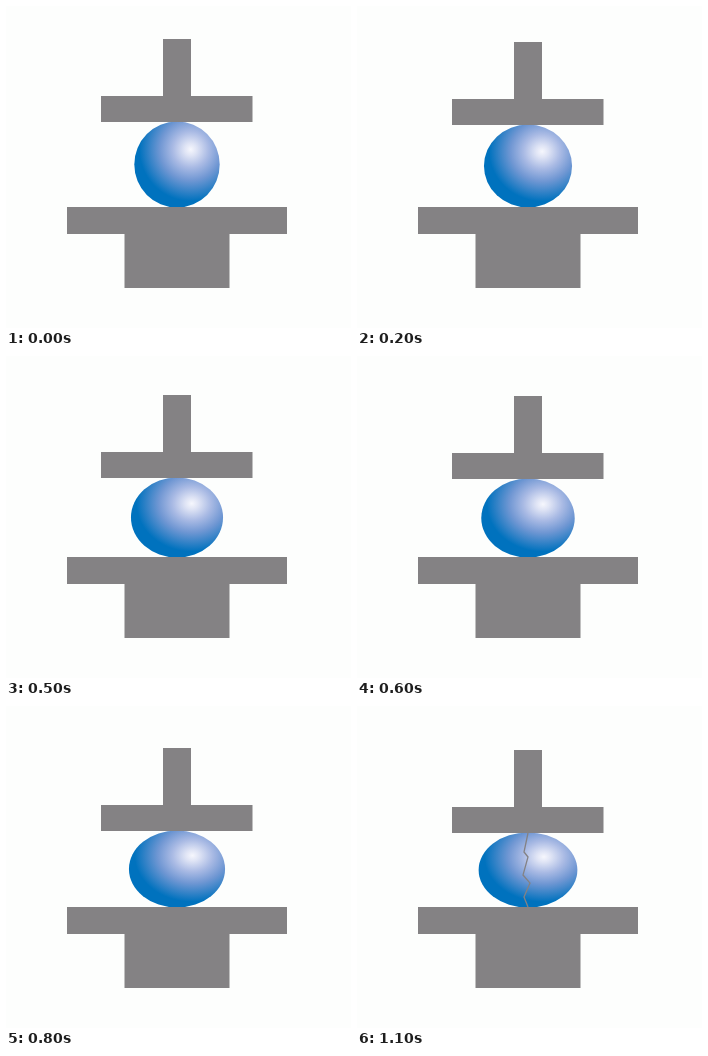
Write an HTML page that moves like this. It is 345 px wide and 322 px high and loops after 1.7 s.

```html
<!DOCTYPE html>
<html>
<head>
<meta charset="utf-8">
<title>Ball in a press</title>
<style>
  html, body { margin: 0; width: 100%; height: 100%; overflow: hidden; background: #fdfefd; }
  svg { display: block; }
</style>
</head>
<body>
<svg width="345" height="322" viewBox="0 0 345 322">
  <defs>
    <radialGradient id="shine" cx=".66" cy=".325" r=".6">
      <stop offset="0" stop-color="#f6f7fd"/>
      <stop offset=".12" stop-color="#dfe4f5"/>
      <stop offset=".35" stop-color="#a9bae4"/>
      <stop offset=".6" stop-color="#7097d3"/>
      <stop offset=".8" stop-color="#3984c8"/>
      <stop offset="1" stop-color="#0072be"/>
    </radialGradient>
  </defs>
  <ellipse id="ball" cx="171" fill="url(#shine)"/>
  <path id="crack" d="M171 127L167 146L171 151L166 169L173 177L167 191L171 201"
        fill="none" stroke="#848284" stroke-width="1.3"/>
  <g fill="#848284">
    <path id="head" d="M157 33H185V90H246.5V116H95V90H157Z"/>
    <path d="M61 201H281V228H223.5V282H118.5V228H61Z"/>
  </g>
</svg>
<script>
  const [ball, crack, head] = ["ball", "crack", "head"].map(id => document.getElementById(id));
  const LOOP = 1700, STEP = 100, LAST = 11, FLOOR = 201.5;

  function draw(now) {
    const step = Math.min(Math.floor(now % LOOP / STEP), LAST);
    const squeeze = Math.min(step, LAST - 1);
    const drop = squeeze && squeeze + 1;   // the first step is a double one
    const top = 115.5 + drop;

    head.setAttribute("transform", `translate(0 ${drop})`);
    ball.setAttribute("rx", 42.7 + 0.67 * squeeze);
    ball.setAttribute("ry", (FLOOR - top) / 2);
    ball.setAttribute("cy", (FLOOR + top) / 2);
    crack.style.display = step === LAST ? "" : "none";
  }

  let start;
  function tick(now) {
    start ??= now;
    draw(now - start);
    requestAnimationFrame(tick);
  }
  draw(0);
  requestAnimationFrame(tick);
</script>
</body>
</html>
```
